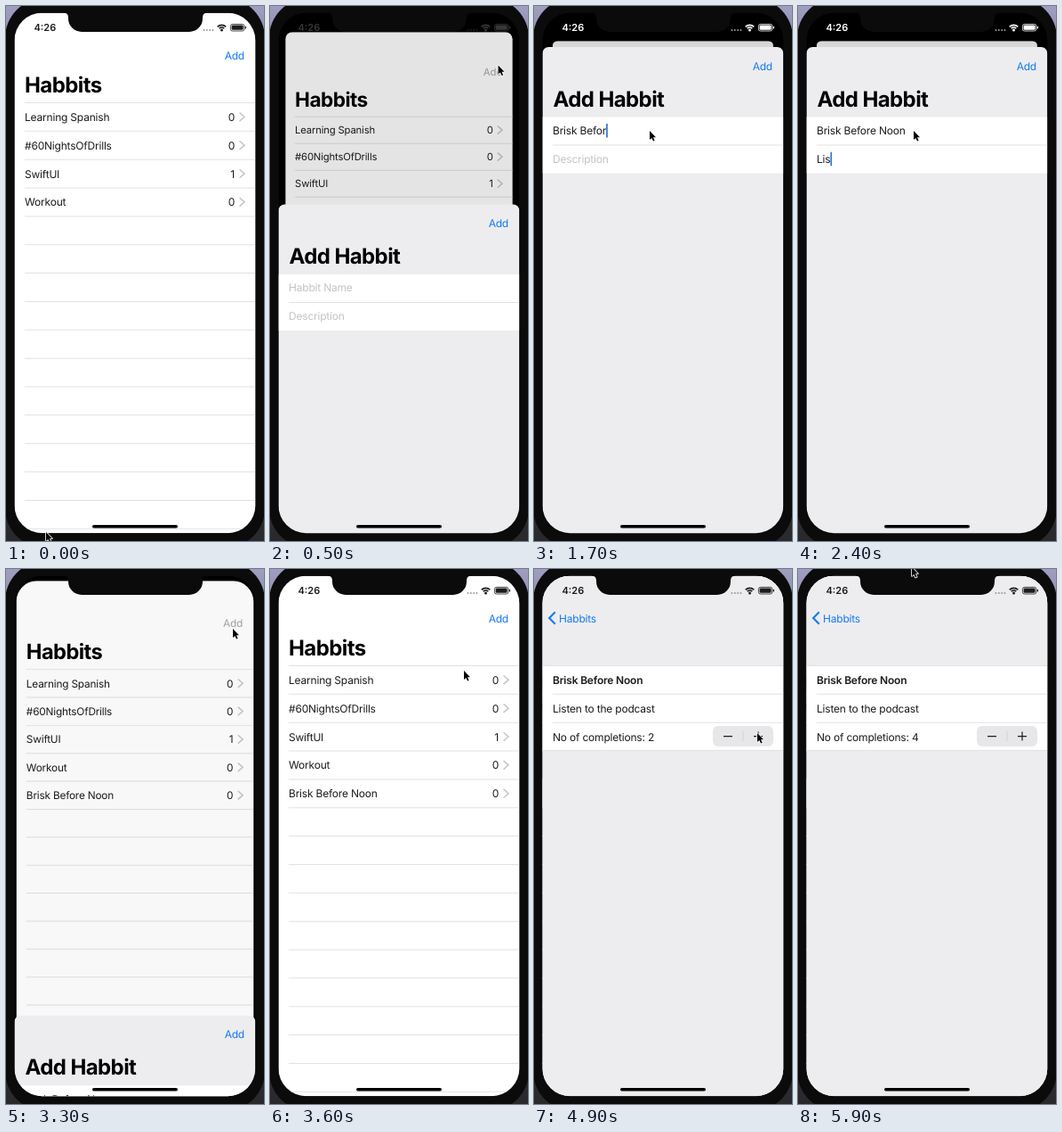
These frames come from a looping animation (290x600 px, 6 s). An HTML page with a canvas:

```html
<!DOCTYPE html>
<html lang="en">
<head>
<meta charset="utf-8">
<title>Habit tracker demo</title>
<style>
html, body { margin: 0; width: 100%; height: 100%; overflow: hidden; background: #000; }
canvas { display: block; width: 290px; height: 600px; }
</style>
</head>
<body>
<canvas id="stage"></canvas>
<script>
const canvas = document.getElementById('stage');
const ctx = canvas.getContext('2d');
const ratio = window.devicePixelRatio || 1;
canvas.width = 290 * ratio;
canvas.height = 600 * ratio;

const LOOP = 6000, STEP = 100;
const BLUE = '#1479f4', GRAY = '#ededef', LINE = '#e2e2e4', INK = '#1c1c1c', BEZEL = '#0b0b0b';
const LEFT = 9.5, RIGHT = 280.3, WIDTH = RIGHT - LEFT, TOP = 7.7, BOTTOM = 591.2, HEIGHT = BOTTOM - TOP;
const ROW = 31.85, LIST_TOP = 108.5;
const NAME = 'Brisk Before Noon', NOTE = 'Listen to the podcast';
const HABITS = [['Learning Spanish', 0], ['#60NightsOfDrills', 0], ['SwiftUI', 1], ['Workout', 0], [NAME, 0]];

const PRESENT = 350, DISMISS = 3100, PUSH = 3800, SETTLE = 4200;
const CLICKS = [4700, 4900, 5100, 5300];
// Pointer stops: time, x, y
const POINTER = [
  [0, 45, 590], [300, 256.5, 66.5], [600, 256.5, 66.5], [900, 130, 140],
  [2950, 130, 140], [3100, 255, 67], [3300, 255, 67], [3550, 218, 114],
  [3600, 218, 114], [3750, 195, 243], [4200, 195, 243], [4500, 251, 184],
  [5400, 251, 184], [5700, 205, 65], [5900, 128, -2]
];

const clamp = (v, lo = 0, hi = 1) => Math.min(hi, Math.max(lo, v));
const mix = (a, b, k) => a + (b - a) * k;
const spring = (ms, rate) => {
  const x = Math.max(0, ms) * rate;
  return 1 - (1 + x) * Math.exp(-x);
};

function group(draw) {
  ctx.save();
  draw();
  ctx.restore();
}

function rect(x, y, w, h, color, radius = 0) {
  ctx.fillStyle = color;
  ctx.beginPath();
  ctx.roundRect(x, y, w, h, radius);
  ctx.fill();
}

const fillScreen = color => rect(LEFT, TOP, WIDTH, HEIGHT, color);

function clipScreen(radius) {
  ctx.beginPath();
  ctx.roundRect(LEFT, TOP, WIDTH, HEIGHT, radius);
  ctx.clip();
}

function stroke(points, color, width) {
  ctx.strokeStyle = color;
  ctx.lineWidth = width;
  ctx.beginPath();
  points.forEach(([x, y]) => ctx.lineTo(x, y));
  ctx.stroke();
}

function text(str, x, y, { color = INK, size = 12, weight = 400, spacing = -0.2, align = 'left' } = {}) {
  ctx.font = `${weight} ${size}px Inter, sans-serif`;
  ctx.textRendering = 'geometricPrecision';
  ctx.letterSpacing = spacing + 'px';
  ctx.textAlign = align;
  ctx.fillStyle = color;
  ctx.fillText(str, x, y);
  return ctx.measureText(str).width;
}

const title = (str, x, y) => text(str, x, y, { size: 24, weight: 700, spacing: -0.6, color: '#000' });
const addButton = (y, color) => text('Add', 268, y, { color, align: 'right' });
const separator = (y, x = 21) => rect(x, y - 0.5, RIGHT - x, 1, LINE);

function statusBar(color) {
  text('4:26', 31.5, 28, { color, size: 11, weight: 600, spacing: 0 });
  for (let i = 0; i < 4; i++) rect(221.5 + i * 3.3, 26, 2, 2, '#999', 1);
  ctx.strokeStyle = ctx.fillStyle = color;
  ctx.lineWidth = 1.7;
  [3.9, 6.7].forEach(r => {
    ctx.beginPath();
    ctx.arc(242.5, 28, r, -2.36, -0.78);
    ctx.stroke();
  });
  ctx.beginPath();
  ctx.arc(242.5, 27, 1.5, 0, 7);
  ctx.fill();
  ctx.lineWidth = 0.8;
  ctx.beginPath();
  ctx.roundRect(252.4, 20.4, 15.4, 7.6, 2.2);
  ctx.stroke();
  rect(253.6, 21.6, 13, 5.2, color, 1.2);
  rect(268.7, 22.7, 1.2, 3, color, 0.6);
}

function habitRows(t) {
  rect(LEFT, TOP, 360, HEIGHT, '#fff');
  if (t >= 3700) rect(LEFT, LIST_TOP + 4 * ROW, WIDTH, ROW, '#d1d1d5');
  for (let i = 0; i < 16; i++) separator(LIST_TOP + i * ROW);
  HABITS.slice(0, t < DISMISS ? 4 : 5).forEach(([name, count], i) => {
    const y = 124.3 + i * ROW;
    text(name, 21, y + 4.5);
    text(count, 257, y + 4.5, { align: 'right' });
    stroke([[262.5, y - 4.8], [268, y], [262.5, y + 4.8]], '#c5c5c8', 1.5);
  });
}

function homeScreen(t, addColor) {
  habitRows(t);
  title('Habbits', 21, 97);
  addButton(60, addColor);
}

function detailPage(t) {
  const count = CLICKS.filter(click => t >= click).length;
  fillScreen(GRAY);
  ctx.translate(0, t < SETTLE ? 25.5 : 0);
  rect(LEFT, LIST_TOP, WIDTH, 95, '#fff');
  [[0, LEFT], [1, 21], [2, 21], [2.98, LEFT]].forEach(([i, x]) => separator(LIST_TOP + i * ROW, x));
  text(NAME, 21, 128.8, { weight: 600 });
  text(NOTE, 21, 160.6);
  text('No of completions: ' + count, 21, 192.5);
  rect(201, 176, 68, 23, '#e7e7e9', 6);
  rect(234.5, 182, 1, 11, '#d2d2d5');
  stroke([[213, 187.6], [223, 187.6]], count ? INK : '#999', 1.2);
  stroke([[247, 187.6], [257, 187.6]], INK, 1.2);
  stroke([[252, 182.6], [252, 192.6]], INK, 1.2);
}

function pushedScreen(t, progress) {
  group(() => {
    ctx.translate(-81 * progress, 0);
    habitRows(t);
  });
  fillScreen(`rgba(0,0,0,${0.09 * progress})`);
  group(() => {
    ctx.globalAlpha = progress;
    rect(LEFT, TOP, WIDTH, 100, GRAY);
  });
  group(() => {
    ctx.translate(270 * (1 - progress), 0);
    detailPage(t);
  });
  group(() => {
    ctx.globalAlpha = (1 - progress) ** 2;
    addButton(60, BLUE);
    ctx.translate(mix(21, 28, progress), mix(97, 59.5, progress));
    ctx.scale(1 - progress / 2, 1 - progress / 2);
    title('Habbits', 0, 0);
  });
  group(() => {
    ctx.globalAlpha = progress;
    stroke([[23.8, 48.3], [17.2, 55], [23.8, 61.7]], BLUE, 2.1);
    text('Habbits', 28 + 30 * (1 - progress), 59.5, { color: BLUE });
  });
}

function addSheet(t, y) {
  const name = NAME.slice(0, clamp(Math.floor((t - 1100) / 52), 0, NAME.length));
  const note = NOTE.slice(0, clamp(Math.floor((t - 2300) * 0.03 + 0.01), 0, NOTE.length));
  const active = t < 900 ? -1 : t < 2200 ? 0 : 1;
  ctx.translate(0, y);
  rect(LEFT, 0, WIDTH, 600, GRAY, [7, 7, 0, 0]);
  addButton(25.5, BLUE);
  title('Add Habbit', 21.5, 66.5);
  rect(LEFT, 78.5, WIDTH, 63, '#fff');
  separator(110);
  [[name, 'Habbit Name'], [note, 'Description']].forEach(([value, hint], i) => {
    const base = 98 + i * ROW;
    const width = text(value || hint, 21, base, { color: value ? INK : '#c3c3c6' });
    if (active === i) rect(value ? 21 + width : 20.3, base - 12, 1.7, 15.5, '#2f74d8');
  });
}

function modalScreen(t, progress) {
  fillScreen('#000');
  group(() => {
    ctx.globalAlpha = progress ** 4;
    statusBar('#fff');
  });
  group(() => {
    const scale = 1 - 0.084 * progress;
    ctx.translate(145, TOP + 31.5 * progress);
    ctx.scale(scale, scale);
    ctx.translate(-145, -TOP);
    clipScreen(6 + 26 * (1 - progress) ** 2);
    homeScreen(t, '#a5a5a8');
    fillScreen(`rgba(0,0,0,${0.155 * progress})`);
  });
  group(() => addSheet(t, 600 - 554 * progress));
}

function device() {
  const backdrop = ctx.createLinearGradient(0, 0, 0, 600);
  backdrop.addColorStop(0, '#a09ec0');
  backdrop.addColorStop(0.3, '#55536e');
  backdrop.addColorStop(1, '#29292d');
  rect(0, 0, 290, 600, backdrop);
  rect(-1, -9, 292, 617, BEZEL, 45);
}

function notch() {
  ctx.fillStyle = BEZEL;
  ctx.beginPath();
  ctx.moveTo(65, 7);
  ctx.lineTo(65, TOP);
  ctx.quadraticCurveTo(70, TOP, 70, 13);
  ctx.arcTo(70, 29, 86, 29, 15);
  ctx.arcTo(221, 29, 221, 13, 15);
  ctx.lineTo(221, 13);
  ctx.quadraticCurveTo(221, TOP, 226, TOP);
  ctx.lineTo(226, 7);
  ctx.fill();
}

function pointer(t) {
  const next = POINTER.findIndex(stop => stop[0] > t);
  const to = POINTER.at(next), from = next > 0 ? POINTER[next - 1] : to;
  const k = to === from ? 1 : clamp((t - from[0]) / (to[0] - from[0]));
  const ease = k * k * (3 - 2 * k);
  ctx.translate(mix(from[1], to[1], ease), mix(from[2], to[2], ease));
  ctx.beginPath();
  [[0, 0], [0, 10], [2.3, 7.9], [4, 11.6], [5.6, 10.9], [4, 7.3], [7, 7.2]].forEach(p => ctx.lineTo(...p));
  ctx.closePath();
  ctx.lineJoin = 'round';
  ctx.lineWidth = 1.6;
  ctx.strokeStyle = '#fff';
  ctx.stroke();
  ctx.fillStyle = '#000';
  ctx.fill();
}

function render(t) {
  ctx.setTransform(ratio, 0, 0, ratio, 0, 0);
  device();
  const modal = spring(t - PRESENT, 0.0157) * (1 - spring(t - DISMISS, 0.0157));
  const push = t >= 4300 ? 1 : spring(t - PUSH, 0.02);
  group(() => {
    clipScreen(31);
    if (modal > 0.005) {
      modalScreen(t, modal);
    } else {
      if (push > 0) pushedScreen(t, push);
      else homeScreen(t, BLUE);
      statusBar(INK);
    }
    rect(97, 582, 96, 3.4, '#000', 1.7);
  });
  notch();
  group(() => pointer(t));
}

function tick() {
  render(Math.floor((performance.now() % LOOP) / STEP) * STEP);
  requestAnimationFrame(tick);
}
tick();
</script>
</body>
</html>
```
